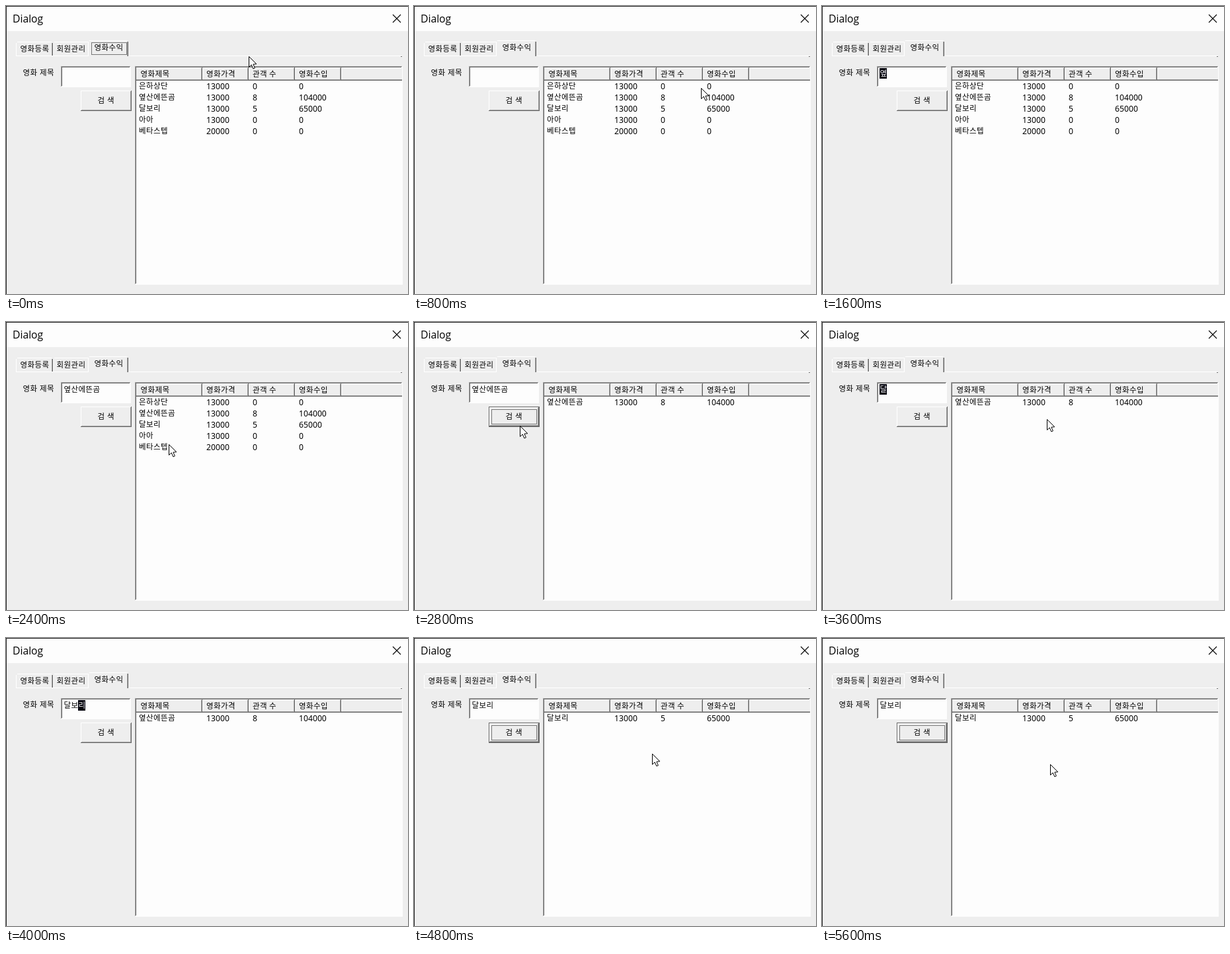
Recreate the animation shown at these times as an HTML page with a canvas. Size 608 by 436 pixels, loop 5800 ms.

```html
<!DOCTYPE html>
<html lang="ko">
<head>
<meta charset="utf-8">
<title>Dialog</title>
<style>
html, body { margin: 0; width: 100%; height: 100%; overflow: hidden; background: #eee; }
canvas { display: block; }
</style>
</head>
<body>
<canvas id="stage" width="608" height="436"></canvas>
<script>
const ctx = document.getElementById('stage').getContext('2d');
const LOOP = 5800;
const FACE = '#eee', PAPER = '#fdfdfd', MID = '#a0a0a0', DARK = '#696969', INK = '#000';
const HANGUL = '11.5px "Noto Sans CJK KR", "Noto Sans CJK", sans-serif';
const DIGITS = '500 12.2px "Noto Sans", sans-serif';
const CHAR = 11;

const MOVIES = [
  ['은하상단', '13000', '0', '0'],
  ['옆산에뜬곰', '13000', '8', '104000'],
  ['달보리', '13000', '5', '65000'],
  ['아아', '13000', '0', '0'],
  ['베타스텝', '20000', '0', '0']
];
const [FIRST, SECOND] = [MOVIES[1][0], MOVIES[2][0]];

// Each step changes part of the state from its time on.
const STEPS = [
  [0, { rows: MOVIES, text: '', mark: '', tabFocus: true, btnFocus: false, caret: false, arrow: [367, 76], beam: null }],
  [200, { arrow: null, beam: [124, 112] }],
  [600, { tabFocus: false, caret: true, beam: null, arrow: [443, 124] }],
  [800, { caret: false, arrow: [434, 124] }],
  [1000, { caret: true }],
  [1200, { caret: false, arrow: null, text: 'ㅇ', mark: 'last' }],
  [1600, { text: FIRST.slice(0, 1) }],
  [1800, { text: FIRST.slice(0, 3) }],
  [2000, { text: FIRST.slice(0, 4), arrow: [329, 124] }],
  [2200, { text: FIRST }],
  [2400, { mark: '', arrow: [246, 185] }],
  [2600, { rows: [MOVIES[1]], btnFocus: true, arrow: [162, 156] }],
  [2800, { arrow: [160, 157] }],
  [3000, { arrow: null, beam: [164, 113] }],
  [3200, { btnFocus: false, mark: 'all', beam: [49, 92] }],
  [3400, { text: 'ㄷ', mark: 'last', beam: null, arrow: [340, 147] }],
  [3600, { text: SECOND.slice(0, 1) }],
  [3800, { text: SECOND.slice(0, 2), arrow: null }],
  [4000, { text: SECOND }],
  [4200, { mark: '', arrow: [315, 172] }],
  [4400, { btnFocus: true, arrow: [150, 142] }],
  [4600, { rows: [MOVIES[2]], arrow: [258, 152] }],
  [4800, { arrow: [360, 175] }],
  [5600, { arrow: [345, 191] }]
];

function stateAt(t) {
  return Object.assign({}, ...STEPS.filter(s => s[0] <= t).map(s => s[1]));
}

function box(x, y, w, h, color) {
  ctx.fillStyle = color;
  ctx.fillRect(x, y, w, h);
}

function label(str, x, y, font = HANGUL, color = INK) {
  ctx.font = font;
  ctx.letterSpacing = font === HANGUL ? '0.42px' : '0px';
  ctx.fillStyle = color;
  ctx.fillText(str, x, y);
}

// One-pixel frame: top and left in one colour, bottom and right in another.
function bevel(x, y, w, h, lit, shade) {
  box(x, y, w, 1, lit);
  box(x, y, 1, h, lit);
  box(x, y + h - 1, w, 1, shade);
  box(x + w - 1, y, 1, h, shade);
}

function sunken(x, y, w, h) {
  box(x, y, w, h, PAPER);
  bevel(x, y, w, h, MID, PAPER);
  bevel(x + 1, y + 1, w - 2, h - 2, DARK, PAPER);
}

function dotted(x, y, w, h) {
  ctx.strokeStyle = INK;
  ctx.lineWidth = 1;
  ctx.setLineDash([1, 1]);
  ctx.strokeRect(x + 0.5, y + 0.5, w - 1, h - 1);
  ctx.setLineDash([]);
}

function polyline(points, closed) {
  ctx.beginPath();
  points.forEach(([x, y]) => ctx.lineTo(x, y));
  if (closed) ctx.closePath();
}

function drawWindow() {
  box(0, 0, 608, 436, FACE);
  box(0, 0, 608, 38, PAPER);
  box(0, 0, 608, 1, '#222');
  box(0, 0, 1, 436, '#222');
  label('Dialog', 10, 25, '15.7px "Open Sans", sans-serif');
  ctx.strokeStyle = INK;
  ctx.lineWidth = 1.1;
  for (const [a, b] of [[13, 25], [25, 13]]) {
    polyline([[585, a], [597, b]]);
    ctx.stroke();
  }
}

function tab(name, x, y, w, h, textX, textY) {
  box(x, y, w, h, FACE);
  box(x, y + 2, 1, h - 2, '#fff');
  box(x + 2, y, w - 4, 1, '#fff');
  box(x + w - 2, y + 2, 1, h - 2, MID);
  box(x + w - 1, y + 2, 1, h - 2, DARK);
  label(name, textX, textY);
}

function drawTabs(focus) {
  box(15, 75, 584, 1, '#fff');
  box(597, 76, 2, 1, DARK);
  tab('영화등록', 15, 54, 56, 21, 21.5, 69);
  tab('회원관리', 71, 54, 55, 21, 76.5, 69);
  tab('영화수익', 124, 52, 61, 24, 133.5, 67);
  if (focus) dotted(129, 55, 54, 19);
}

function drawEdit(s) {
  label('영화', 25.5, 105);
  label('제목', 51, 105);
  sunken(83, 91, 106, 32);
  const n = s.text.length;
  label(s.text, 87.5, 106);
  if (s.mark) {
    const from = s.mark === 'all' ? 0 : n - 1;
    box(87 + from * CHAR, 94, (n - from) * CHAR, 16, s.mark === 'all' ? '#0078d7' : '#00000c');
    label(s.text.slice(from), 87.5 + from * CHAR, 106, HANGUL, '#fff');
  }
  if (s.caret) box(87, 95, 1, 14, INK);
}

function drawButton(focus) {
  const [x, y, w, h] = [113, 128, 77, 31];
  const i = focus ? 1 : 0;
  bevel(x + i, y + i, w - 2 * i, h - 2 * i, '#fff', DARK);
  box(x + 1 + i, y + h - 2 - i, w - 2 - 2 * i, 1, MID);
  box(x + w - 2 - i, y + 1 + i, 1, h - 2 - 2 * i, MID);
  if (focus) {
    bevel(x, y, w, h, DARK, DARK);
    dotted(x + 4, y + 4, w - 8, h - 8);
  }
  label('검', 138.5, 147);
  label('색', 153, 147);
}

function drawList(rows) {
  sunken(195, 91, 405, 331);
  box(197, 93, 402, 20, FACE);
  box(197, 93, 402, 1, '#fff');
  box(197, 111, 402, 1, MID);
  box(197, 112, 402, 1, DARK);
  ['영화제목', '영화가격', '관객 수', '영화수입'].forEach((name, i) => {
    const edge = 296 + 70 * i;
    box(edge - 1, 94, 1, 18, MID);
    box(edge, 93, 1, 19, DARK);
    box(edge + 1, 93, 1, 18, '#fff');
    label(name, i ? edge - 63 : 203.5, 107);
  });
  rows.forEach((row, r) => {
    const y = 125 + 17 * r;
    label(row[0], 201, y);
    row.slice(1).forEach((v, c) => label(v, 303 + 70 * c, y + 1, DIGITS));
  });
}

function drawArrow(x, y) {
  ctx.save();
  ctx.translate(x + 0.5, y + 0.5);
  polyline([[0, 0], [0, 16], [3.7, 12.5], [6.4, 18.5], [8.9, 17.4], [6.4, 11.7], [11.3, 11.3]], true);
  ctx.fillStyle = '#fff';
  ctx.fill();
  ctx.strokeStyle = INK;
  ctx.lineWidth = 1;
  ctx.stroke();
  ctx.restore();
}

function drawBeam(x, y) {
  box(x, y - 7, 1, 15, INK);
  for (const top of [y - 8, y + 8]) {
    box(x - 3, top, 3, 1, INK);
    box(x + 1, top, 3, 1, INK);
  }
}

function draw() {
  const s = stateAt(performance.now() % LOOP);
  drawWindow();
  drawTabs(s.tabFocus);
  drawEdit(s);
  drawButton(s.btnFocus);
  drawList(s.rows);
  if (s.arrow) drawArrow(...s.arrow);
  if (s.beam) drawBeam(...s.beam);
  requestAnimationFrame(draw);
}
draw();
</script>
</body>
</html>
```
